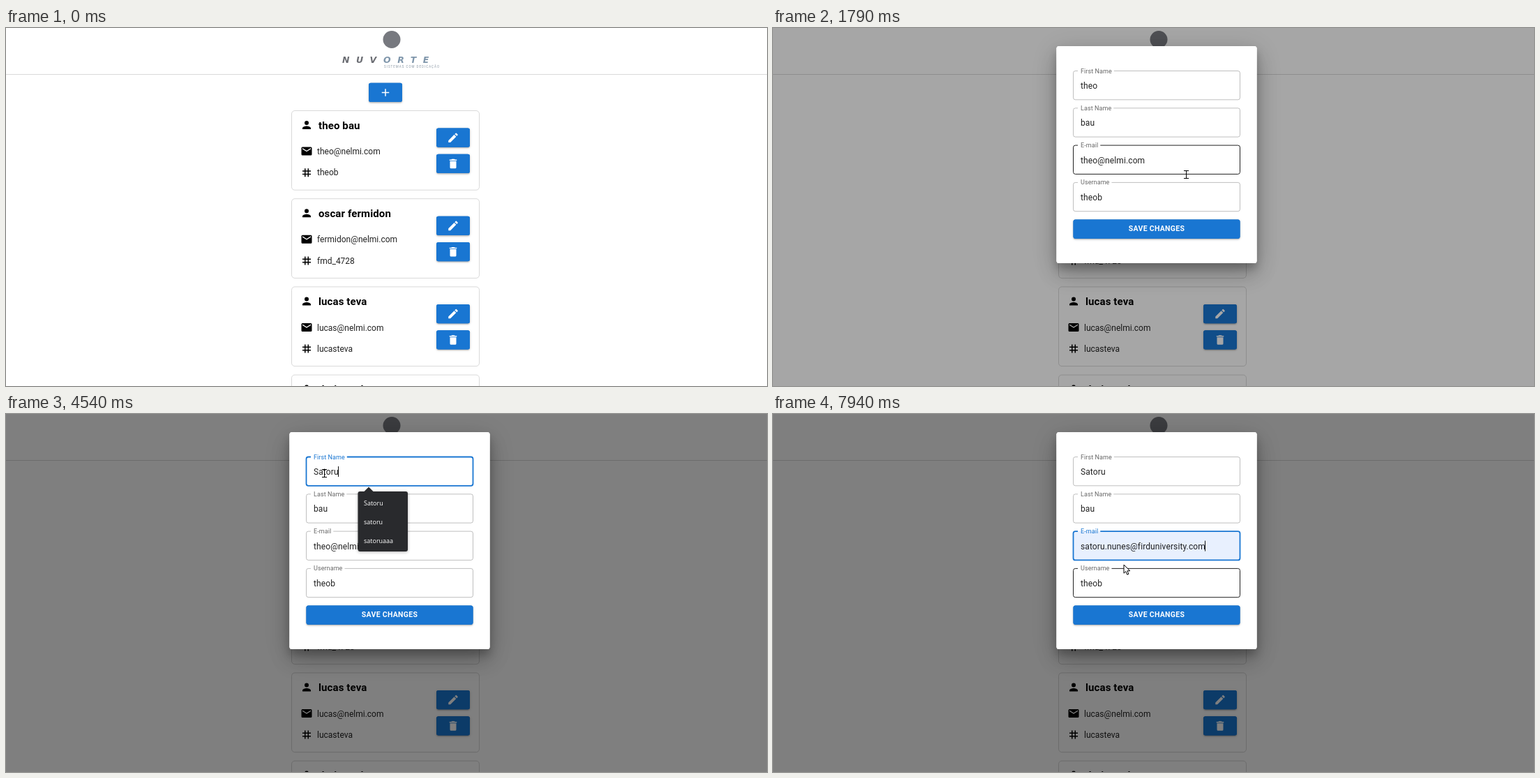
These frames come from a looping animation (1091x513 px, 8000 ms). An HTML page with a canvas:

```html
<!DOCTYPE html>
<html lang="en">
<head>
<meta charset="utf-8">
<title>User list</title>
<style>
html, body { margin: 0; width: 100%; height: 100%; overflow: hidden; background: #fff; }
canvas { display: block; }
</style>
</head>
<body>
<canvas id="stage" width="1091" height="513"></canvas>
<script>
const ctx = document.getElementById('stage').getContext('2d');
const LOOP = 8000;
const BLUE = '#1976d2', BLUE_DARK = '#1565c0', INK = 'rgba(0,0,0,.87)';

const icons = {
  person: 'M12 12a4 4 0 1 0 0-8a4 4 0 0 0 0 8zm0 2c-2.67 0-8 1.34-8 4v2h16v-2c0-2.66-5.33-4-8-4z',
  mail: 'M20 4H4a2 2 0 0 0-2 2V18a2 2 0 0 0 2 2h16a2 2 0 0 0 2-2V6a2 2 0 0 0-2-2zm0 4l-8 5-8-5V6l8 5 8-5z',
  tag: 'M20 10V8h-4V4h-2v4h-4V4H8v4H4v2h4v4H4v2h4v4h2v-4h4v4h2v-4h4v-2h-4v-4zm-6 4h-4v-4h4z',
  edit: 'M3 17.25V21h3.75L17.81 9.94l-3.75-3.75zM20.71 7.04a1 1 0 0 0 0-1.41l-2.34-2.34a1 1 0 0 0-1.41 0l-1.83 1.83 3.75 3.75z',
  trash: 'M6 19a2 2 0 0 0 2 2h8a2 2 0 0 0 2-2V7H6zM19 4h-3.5l-1-1h-5l-1 1H5v2h14z',
  add: 'M19 13h-6v6h-2v-6H5v-2h6V5h2v6h6z'
};
for (const k in icons) icons[k] = new Path2D(icons[k]);
const arrow = new Path2D('M0 0V12.2L2.8 9.6L4.8 14.2L6.9 13.3L4.9 8.8H8.7z');

const users = [
  ['theo bau', 'theo@nelmi.com', 'theob'],
  ['oscar fermidon', 'fermidon@nelmi.com', 'fmd_4728'],
  ['lucas teva', 'lucas@nelmi.com', 'lucasteva'],
  ['dario molt', 'dario@nelmi.com', 'dariom']
];
const labels = ['First Name', 'Last Name', 'E-mail', 'Username'];
const nameHints = ['Satoru', 'satoru', 'satoruaaa'];
const fullMail = 'satoru.nunes@firduniversity.com';
const mailHints = [fullMail, 'satoru@nelmi.com', 'satoruaaa@nelmi.com'];

// Pointer route: time, x, y
const route = [
  [130, 912, 461], [270, 800, 330], [480, 640, 160], [620, 548, 92], [760, 504, 112],
  [1040, 504, 112], [1520, 640, 158], [1635, 652, 150], [1710, 648, 161], [1860, 535, 258],
  [2210, 456, 85], [4540, 456, 85], [4890, 512, 246], [5160, 537, 190], [5300, 537, 189],
  [5580, 371, 204], [5640, 378, 201], [7170, 378, 201], [7520, 540, 233], [7730, 540, 234],
  [7940, 503, 216]
];
// Bursts of pointer movement: start, end, steps
const bursts = [[130, 760, 10], [1110, 1860, 11], [1930, 2210, 5],
  [4540, 5300, 11], [5370, 5640, 5], [7240, 7940, 11]];

function snap(t) {
  let out = 0;
  for (const [start, end, n] of bursts) {
    if (t < start) break;
    const step = (end - start) / (n - 1);
    out = start + Math.min(n - 1, Math.floor((t - start) / step + 1e-6)) * step;
  }
  return out;
}

function pointerAt(t) {
  const s = snap(t);
  let i = 0;
  while (i < route.length - 2 && s > route[i + 1][0]) i++;
  const [t0, x0, y0] = route[i], [t1, x1, y1] = route[i + 1];
  const k = Math.max(0, Math.min(1, (s - t0) / (t1 - t0)));
  return { x: x0 + (x1 - x0) * k, y: y0 + (y1 - y0) * k };
}

// Latest value whose time has come
function latest(t, list) {
  let v = list[0][1];
  for (const [at, value] of list) if (t >= at) v = value;
  return v;
}

function text(s, x, y, font, color, spacing = 0, align = 'left') {
  ctx.font = font;
  ctx.fillStyle = color;
  ctx.letterSpacing = spacing + 'px';
  ctx.textAlign = align;
  ctx.fillText(s, x, y);
}
const roboto = (size, weight = 400) => `${weight} ${size}px Roboto, sans-serif`;

function box(x, y, w, h, r) {
  ctx.beginPath();
  ctx.roundRect(x, y, w, h, r);
}

// Filled rounded box with shadows given as [offset, blur, alpha]
function raised(x, y, w, h, r, color, shadows) {
  ctx.save();
  ctx.fillStyle = color;
  box(x, y, w, h, r);
  for (const [dy, blur, a] of shadows) {
    ctx.shadowOffsetY = dy;
    ctx.shadowBlur = blur;
    ctx.shadowColor = `rgba(0,0,0,${a})`;
    ctx.fill();
  }
  ctx.restore();
}

function icon(name, cx, cy, color) {
  ctx.save();
  ctx.translate(cx - 9, cy - 9);
  ctx.scale(.75, .75);
  ctx.fillStyle = color;
  ctx.fill(icons[name]);
  ctx.restore();
}

const low = [[1.5, 1.5, .2], [.75, 4, .14]];
const high = [[1.5, 3, .2], [3, 4, .14], [.75, 7.5, .12]];

function iconButton(name, x, y, p) {
  const hot = p && p.x >= x && p.x <= x + 48 && p.y >= y && p.y <= y + 27;
  raised(x, y, 48, 27.3, 3, hot ? BLUE_DARK : BLUE, hot ? high : low);
  icon(name, x + 24, y + 13.7, '#fff');
}

function drawPage(p) {
  ctx.fillStyle = '#fff';
  ctx.fillRect(0, 0, 1091, 513);

  ctx.fillStyle = '#77797f';
  ctx.beginPath();
  ctx.arc(553, 16.5, 12.5, 0, 7);
  ctx.fill();
  const brand = 'italic 700 12.5px "DejaVu Sans", sans-serif';
  text('NUV', 482, 49.5, brand, '#6b6d73', 9.5);
  text('ORTE', 541, 49.5, brand, '#7f96ab', 9.5);
  text('SISTEMAS COM DEDICAÇÃO', 542, 57, roboto(4.5), '#8b98a5', 1);

  ctx.fillStyle = '#dadada';
  ctx.fillRect(0, 66, 1091, 1);
  iconButton('add', 520, 78.7, p);

  users.forEach(([name, mail, nick], i) => {
    const y = 118.5 + i * 126.2;
    box(409.5, y, 269, 113.7, 4.5);
    ctx.lineWidth = 1;
    ctx.strokeStyle = '#d9d9d9';
    ctx.stroke();
    icon('person', 431, y + 20.5, '#000');
    icon('mail', 431, y + 58, '#000');
    icon('tag', 431, y + 88.7, '#000');
    text(name, 448, y + 26, roboto(15, 700), '#000', .11);
    text(mail, 446, y + 62.6, roboto(12), INK);
    text(nick, 446, y + 92.8, roboto(12), INK);
    iconButton('edit', 617, y + 25, p);
    iconButton('trash', 617, y + 62.3, p);
  });
}

const fieldY = i => 61.5 + i * 53.3;

function drawField(i, o) {
  const x = 430.5, y = fieldY(i), w = 239, h = 41.3;
  const line = o.focus ? 1.8 : 1;
  if (o.filled) {
    ctx.fillStyle = '#e8f0fe';
    box(x, y, w, h, 3);
    ctx.fill();
  }
  ctx.strokeStyle = o.focus ? BLUE : o.hover ? 'rgba(0,0,0,.87)' : 'rgba(0,0,0,.25)';
  ctx.lineWidth = line;
  ctx.font = roboto(9);
  ctx.letterSpacing = '.08px';
  const lw = ctx.measureText(labels[i]).width;

  // Border with a gap for the label
  ctx.save();
  ctx.beginPath();
  ctx.rect(0, 0, 1091, 513);
  ctx.rect(437, y - 2, lw + 7, 4);
  ctx.clip('evenodd');
  box(x, y, w, h, 3);
  ctx.stroke();
  ctx.restore();
  text(labels[i], 441, y + 3, roboto(9), o.focus ? BLUE : 'rgba(0,0,0,.6)', .08);

  ctx.font = roboto(12);
  ctx.letterSpacing = '.11px';
  const tw = ctx.measureText(o.value).width;
  if (o.select) {
    const left = 441 + tw * (1 - o.select);
    ctx.fillStyle = '#3390ff';
    ctx.fillRect(left, y + 13, tw * o.select, 16.5);
  }
  text(o.value, 441, y + 25.4, roboto(12), o.select > .5 ? '#fff' : INK, .11);
  if (o.focus && !o.select) {
    ctx.fillStyle = '#111';
    ctx.fillRect(Math.round(440.6 + tw), y + 13.5, 1, 15);
  }
}

function drawHints(top, width, items, p) {
  raised(504.5, top, width, 86, 3, '#292a2d', [[1, 4, .3]]);
  ctx.beginPath();
  ctx.moveTo(513, top + .5);
  ctx.lineTo(520, top - 6.5);
  ctx.lineTo(527, top + .5);
  ctx.fillStyle = '#292a2d';
  ctx.fill();
  items.forEach((s, i) => {
    const y = top + 2.5 + i * 27;
    if (p.x > 505 && p.x < 504 + width && p.y >= y && p.y < y + 27) {
      ctx.fillStyle = '#414346';
      ctx.fillRect(504.5, y, width, 27);
    }
    text(s, 513, y + 17.3, '9px "Open Sans", sans-serif', '#fff');
  });
}

function drawDialog(t, p) {
  ctx.fillStyle = `rgba(0,0,0,${latest(t, [[0, .09], [1785, .35], [1860, .5]])})`;
  ctx.fillRect(0, 0, 1091, 513);
  raised(406.5, 26, 287, 311, 3.5, '#fff', [[8, 12, .2], [18, 30, .16], [7, 36, .16]]);

  const nameOpen = t >= 3280 && t < 5230;
  const mailOpen = t >= 6570 && t < 7660;
  const preview = t >= 7450;
  const focus = latest(t, [[0, -1], [2410, 0], [5230, 2]]);
  const values = [
    latest(t, [[0, 'theo'], [2880, ''], [3280, 'S'], [3410, 'Sa'], [3610, 'Sat'],
      [3740, 'Sato'], [4010, 'Satoru']]),
    'bau',
    latest(t, [[0, users[0][1]], [6170, ''], [6570, 's'], [6830, 'sa'], [7450, fullMail]]),
    users[0][2]
  ];
  const drag = Math.max(0, Math.min(1, (532 - p.x) / 91));
  const select = [
    t >= 2550 && t < 2880 ? 1 : 0, 0,
    t >= 5300 && t < 6170 ? drag : 0, 0
  ];
  values.forEach((value, i) => {
    const inside = p.x > 430 && p.x < 670 && p.y >= fieldY(i) - 6 && p.y < fieldY(i) + 47;
    drawField(i, {
      value, select: select[i], focus: focus === i,
      hover: inside && !mailOpen, filled: i === 2 && preview
    });
  });

  raised(430.5, 274.5, 239, 27.3, 3, BLUE, low);
  text('SAVE CHANGES', 550, 291.2, roboto(10.5, 600), '#fff', .3, 'center');
  if (nameOpen) drawHints(111, 71.5, nameHints, p);
  if (mailOpen) drawHints(218, 170.5, mailHints, p);
}

function drawPointer(t, p, dialog) {
  if (t < 130 || (t >= 3280 && t < 4540)) return;
  const early = t >= 1635 && t < 1720;
  const overField = dialog && p.x > 430 && p.x < 670 && t < 7240 &&
    labels.some((_, i) => p.y >= fieldY(i) && p.y < fieldY(i) + 47);
  ctx.save();
  ctx.translate(Math.round(p.x), Math.round(p.y));
  if (early || overField) {
    ctx.globalAlpha = early ? .45 : 1;
    ctx.fillStyle = early ? '#ccc' : '#000';
    ctx.fillRect(0, -6, 1, 12);
    for (const y of [-6, 5]) {
      ctx.fillRect(-3, y, 3, 1);
      ctx.fillRect(1, y, 3, 1);
    }
  } else {
    ctx.fillStyle = '#fff';
    ctx.strokeStyle = '#000';
    ctx.lineWidth = 1;
    ctx.fill(arrow);
    ctx.stroke(arrow);
  }
  ctx.restore();
}

function frame(now) {
  const t = now % LOOP;
  const p = pointerAt(t);
  const dialog = t >= 1710;
  drawPage(dialog || t < 130 ? null : p);
  if (dialog) drawDialog(t, p);
  drawPointer(t, p, dialog);
  requestAnimationFrame(frame);
}

const begin = performance.now();
requestAnimationFrame(function tick(now) {
  frame(Math.max(0, now - begin));
  function next(n) { }
});
</script>
</body>
</html>
```
